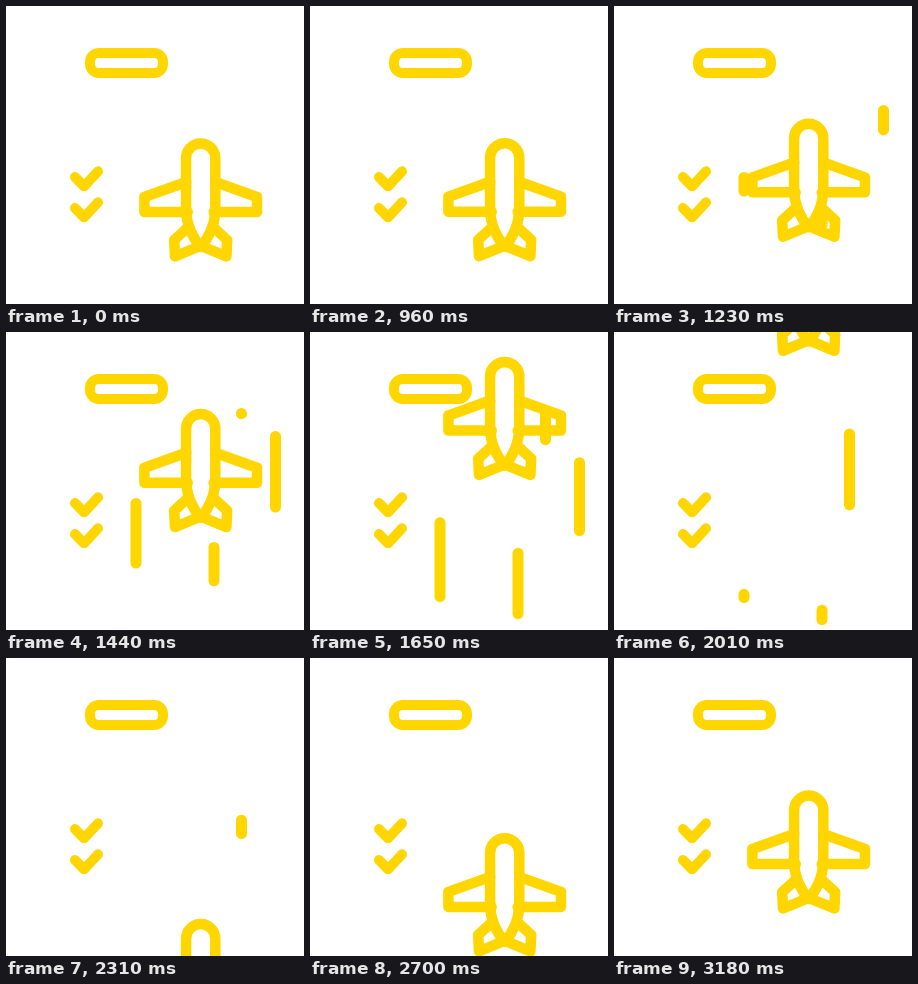
An HTML page that plays this animation: 298 by 298 pixels, repeating every 3600 ms.

```html
<!DOCTYPE html>
<html lang="en">
<head>
<meta charset="utf-8">
<title>Departing plane</title>
<style>
  html, body { margin: 0; width: 100%; height: 100%; overflow: hidden; background: #fff; }
  svg { display: block; width: 100vw; height: 100vh; }
  .ink { fill: none; stroke: #ffd600; stroke-width: 10; stroke-linecap: round; stroke-linejoin: round; }
  #plane { stroke-width: 10.5; }
  #trails { stroke-width: 11; }
</style>
</head>
<body>
<svg viewBox="0 0 298 298">
  <defs>
    <path id="check" d="M69 171l9 9.3 14-15"/>
    <g id="side">
      <path d="M-14.5 176L-56.3 191V206H-13"/>
      <path d="M-13.4 222L-26.5 234L-25.7 250.4L-.5 240"/>
    </g>
  </defs>
  <g class="ink">
    <rect x="84" y="47" width="73" height="20" rx="9"/>
    <use href="#check"/>
    <use href="#check" y="31"/>
  </g>
  <g class="ink" id="trails"></g>
  <g class="ink" id="plane">
    <path d="M-14.6 152a14.6 14.6 0 0 1 29.2 0V203C14.6 218 8 232 0 241C-8 232-14.6 218-14.6 203Z"/>
    <use href="#side"/>
    <use href="#side" transform="scale(-1 1)"/>
  </g>
</svg>
<script>
  const LOOP = 3600, LAG = 390;
  const LEAVE = 930, WRAP = 2085, LAND = 3195;
  const plane = document.getElementById('plane');
  const trailBox = document.getElementById('trails');

  const trails = [
    { x: 269.5, top: 104.5, len: 94, start: 1070, dur: 550 },
    { x: 130, top: 171.5, len: 94, start: 1087, dur: 600 },
    { x: 208, top: 215.5, len: 72, start: 1156, dur: 600 },
    { x: 235.5, top: 81.5, len: 94, start: 1425, dur: 650 }
  ];

  for (const trail of trails) {
    trail.line = document.createElementNS('http://www.w3.org/2000/svg', 'line');
    trail.line.setAttribute('x1', trail.x);
    trail.line.setAttribute('x2', trail.x);
    trailBox.append(trail.line);
  }

  const clamp = u => Math.min(1, Math.max(0, u));

  // Slow start; k = 1 also gives a slow finish.
  const ease = (u, k) => 3 * (1 - u) * u * u * k + u * u * u;

  function planeShift(t) {
    if (t < WRAP) return -262 * ease(clamp((t - LEAVE) / (WRAP - LEAVE)), 0.38);
    return 195 * ease(clamp((LAND - t) / (LAND - WRAP)), 0.4);
  }

  function drawTrail({ line, top, len, start, dur }, t) {
    const at = time => top + len * ease(clamp((time - start) / dur), 1);
    const visible = t > start && t < start + dur + LAG;
    line.setAttribute('visibility', visible ? 'visible' : 'hidden');
    line.setAttribute('y1', at(t - LAG));
    line.setAttribute('y2', at(t));
  }

  function draw(t) {
    plane.setAttribute('transform', `translate(194.7 ${planeShift(t)})`);
    for (const trail of trails) drawTrail(trail, t);
  }

  const begin = performance.now();
  function tick() {
    draw((performance.now() - begin) % LOOP);
    requestAnimationFrame(tick);
  }
  tick();
</script>
</body>
</html>
```
